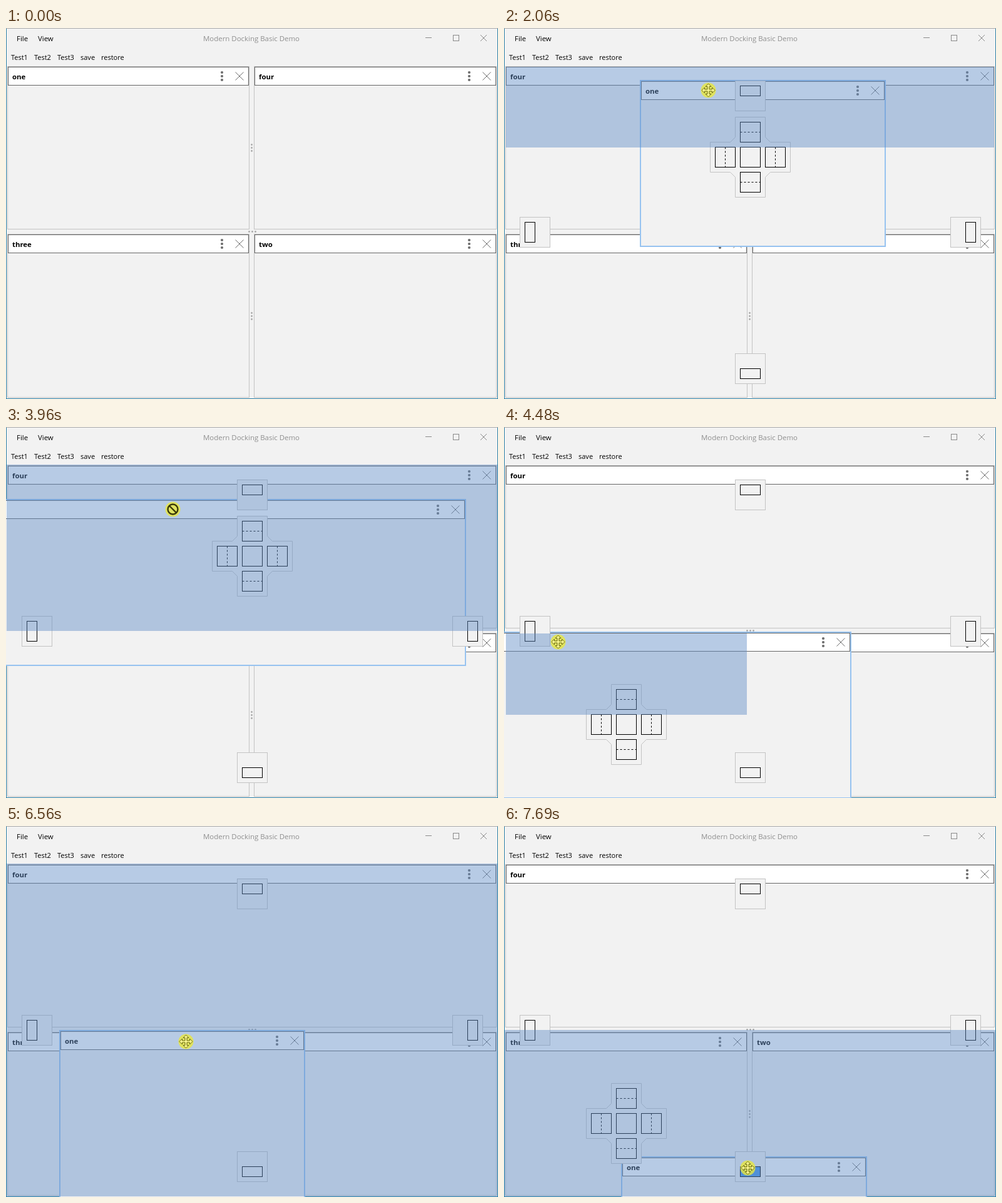
Write an HTML page with a canvas that moves like this. It is 786x593 px and loops after 8 s.

```html
<!DOCTYPE html>
<html lang="en">
<head>
<meta charset="utf-8">
<title>Docking demo</title>
<style>
html, body { margin: 0; width: 100%; height: 100%; overflow: hidden; background: #f2f2f2; }
canvas { display: block; }
</style>
</head>
<body>
<canvas id="stage" width="786" height="593"></canvas>
<script>
const ctx = document.getElementById('stage').getContext('2d');
const LOOP = 8000, BG = '#f2f2f2', FOCUS = '#97c3f0', ICON = '#6e6e6e', EDGE = '#c3c3c3';
const ROOT = [2, 61, 784, 591], AREA = [1, 60, 785, 592];
const DENY = 240, PREVIEW_LAG = 18, HOVER_LAG = 280;

// Pointer moves: from time, to time, end x, end y, bend; it rests in between
const ENTER = [640, 592];
const MOVES = [
  [30, 820, 108, 84, 2], [850, 970, 110, 76],
  [1480, 2060, 326, 99], [2060, 2260, 352, 110], [2400, 2570, 386, 106],
  [3310, 3500, 320, 76],
  [3750, 3960, 266, 131], [3960, 4480, 86, 343], [4580, 4960, 42, 328],
  [5480, 5920, 198, 106], [5920, 6010, 203, 78],
  [6280, 6560, 287, 344], [6560, 7070, 355, 521], [7110, 7360, 372, 540], [7520, 7690, 389, 546]
];

// Layout trees: [direction, first, second]
const BOTTOM = ['v', 'three', 'two'];
const REST = ['h', 'four', BOTTOM];
const START = ['h', ['v', 'one', 'four'], BOTTOM];

// Each drag of panel "one": its times, the root side it docks to, the layout after
const DRAGS = [
  { press: 1220, start: 1480, drop: 2880, side: 'n', tree: ['h', 'one', REST] },
  { press: 3750, start: 3750, drop: 5450, side: 'w', tree: ['v', 'one', REST] },
  { press: 6150, start: 6280, drop: LOOP }
];

const SIDES = { n: [0, -1], s: [0, 1], w: [-1, 0], e: [1, 0] };

function pointer(t) {
  let [x, y] = ENTER;
  for (const [from, to, x1, y1, bend = 1] of MOVES) {
    const k = Math.min(1, Math.max(0, (t - from) / (to - from)));
    x += (x1 - x) * k ** bend;
    y += (y1 - y) * k;
    if (k < 1) break;
  }
  return [Math.round(x), Math.round(y)];
}

const inside = ([x0, y0, x1, y1], x, y) => x >= x0 && x < x1 && y >= y0 && y < y1;
const mid = (a, b) => Math.floor((a + b) / 2);

function box(x, y, w, h, stroke, fill) {
  if (fill) { ctx.fillStyle = fill; ctx.fillRect(x, y, w, h); }
  if (stroke) {
    ctx.strokeStyle = stroke;
    ctx.strokeRect(x + .5, y + .5, w - 1, h - 1);
  }
}

function lines(color, ...paths) {
  ctx.strokeStyle = color;
  ctx.beginPath();
  for (const p of paths) p.forEach(([x, y], i) => i ? ctx.lineTo(x, y) : ctx.moveTo(x, y));
  ctx.stroke();
}

function shape(x, y, pts, fill, stroke) {
  ctx.beginPath();
  for (const [dx, dy] of pts) ctx.lineTo(x + dx, y + dy);
  ctx.closePath();
  ctx.fillStyle = fill;
  ctx.fill();
  ctx.strokeStyle = stroke;
  ctx.stroke();
}

// Repeats a list of points in four quarter turns
function fourfold(pts) {
  const turn = list => list.map(([x, y]) => [-y, x]);
  const b = turn(pts), c = turn(b);
  return [...pts, ...b, ...c, ...turn(c)];
}

function dot(x, y, r, color) {
  ctx.fillStyle = color;
  ctx.beginPath();
  ctx.arc(x, y, r, 0, 7);
  ctx.fill();
}

function text(s, x, y, size, color = '#000', weight = 400) {
  ctx.font = `${weight} ${size}px "Open Sans", "Noto Sans", sans-serif`;
  ctx.fillStyle = color;
  ctx.fillText(s, x, y);
}

function cross(x, y, r, color) {
  lines(color, [[x - r, y - r], [x + r, y + r]], [[x + r, y - r], [x - r, y + r]]);
}

function chrome(active) {
  const ink = active ? '#000' : '#8a8a8a';
  box(0, 0, 786, 593, active ? '#20505f' : '#2a7ea6', BG);
  box(0, 0, 786, 1, null, active ? '#6f7678' : '#a9a9a9');
  text('File', 17, 21, 11.4);
  text('View', 51, 21, 11.4);
  text('Modern Docking Basic Demo', 315, 21, 11.44, active ? '#5c5560' : '#8f8f8f');
  ['Test1', 'Test2', 'Test3', 'save', 'restore'].forEach((s, i) =>
    text(s, 8 + 37 * i - (i > 3 ? 4 : 0), 51, 11));
  box(670, 15, 10, 1, null, ink);
  box(714, 11, 10, 10, ink);
  cross(763, 16, 5, ink);
}

function panel(name, [x0, y0, x1, y1], focus) {
  box(x0, y0, x1 - x0, y1 - y0, EDGE, BG);
  if (focus) {
    ctx.lineWidth = 2;
    ctx.strokeStyle = FOCUS;
    ctx.strokeRect(x0, y0, x1 - x0, y1 - y0);
    ctx.lineWidth = 1;
  }
  box(x0 + 1, y0 + 1, x1 - x0 - 2, 30, '#666', '#fff');
  text(name, x0 + 8, y0 + 21, 11.4, '#000', 700);
  for (const d of [-6, 0, 6]) dot(x1 - 44, y0 + 16 + d, 2.1, ICON);
  cross(x1 - 16, y0 + 16, 6.5, ICON);
}

// Splits the area in halves and collects panels and divider grips
function arrange(node, [x0, y0, x1, y1], out = { panels: {}, grips: [] }) {
  if (typeof node === 'string') {
    out.panels[node] = [x0, y0, x1, y1];
    return out;
  }
  const [dir, a, b] = node;
  if (dir === 'v') {
    const m = mid(x0, x1 - 7);
    out.grips.push([m + 3.5, mid(y0, y1) + .5, 0, 5]);
    arrange(a, [x0, y0, m, y1], out);
    arrange(b, [m + 7, y0, x1, y1], out);
  } else {
    const m = mid(y0, y1 - 7);
    out.grips.push([mid(x0, x1) + .5, m + 3.5, 5, 0]);
    arrange(a, [x0, y0, x1, m], out);
    arrange(b, [x0, m + 7, x1, y1], out);
  }
  return out;
}

function half([x0, y0, x1, y1], side) {
  const mx = mid(x0, x1), my = mid(y0, y1);
  return { n: [x0, y0, x1, my], s: [x0, my, x1, y1], w: [x0, y0, mx, y1],
    e: [mx, y0, x1, y1] }[side] || [x0, y0, x1, y1];
}

function nearSide([x0, y0, x1, y1], x, y) {
  const h = (x - x0) / (x1 - x0), v = (y - y0) / (y1 - y0);
  const dh = Math.min(h, 1 - h), dv = Math.min(v, 1 - v);
  if (Math.min(dh, dv) > .35) return 'c';
  return dh < dv ? (h < .5 ? 'w' : 'e') : (v < .5 ? 'n' : 's');
}

// Outer corner and inner rectangle of the dock handle on a side
function handle(side) {
  const [dx, dy] = SIDES[side], ox = 369 + 344 * dx, oy = 302 + 218 * dy;
  return { ox, oy, x: ox + (dx > 0 ? 24 : 8), y: oy + (dy > 0 ? 24 : 8),
    w: dx ? 17 : 33, h: dy ? 17 : 33 };
}

function handles(hot) {
  for (const side in SIDES) {
    const { ox, oy, x, y, w, h } = handle(side);
    box(ox, oy, 49, 49, EDGE, BG);
    box(x, y, w, h, '#000', side === hot ? '#4393e7' : null);
  }
}

function compass([x0, y0, x1, y1]) {
  const cx = mid(x0, x1) + .5, cy = mid(y0 + 30, y1) + .5;
  shape(cx, cy, fourfold([[-24, -64], [24, -64], [24, -32], [32, -24]]), BG, EDGE);
  for (const [dx, dy] of [[0, 0], ...Object.values(SIDES)]) {
    const x = cx + 40 * dx, y = cy + 40 * dy;
    box(x - 16.5, y - 16.5, 33, 33, '#000');
    ctx.setLineDash([3, 3]);
    if (dy) lines('#000', [[x - 16, y], [x + 16, y]]);
    if (dx) lines('#000', [[x, y - 16], [x, y + 16]]);
    ctx.setLineDash([]);
  }
}

function arrow(x, y) {
  shape(x + .5, y + .5, [[0, 0], [0, 16], [3.7, 12.5], [6.3, 18], [8.7, 17], [6.2, 11.5], [11, 11.3]],
    '#fff', '#000');
}

function moveIcon(x, y) {
  const arm = [[-1.5, -1.5], [-1.5, -6], [-4.5, -6], [0, -10.5], [4.5, -6], [1.5, -6]];
  shape(x + .5, y + .5, fourfold(arm), '#f7f58c', '#6b6a10');
}

function denyIcon(x, y) {
  ctx.lineWidth = 2.4;
  ctx.strokeStyle = '#3b3a08';
  ctx.beginPath();
  ctx.arc(x + .5, y + .5, 8, 0, 7);
  ctx.moveTo(x - 5, y - 5);
  ctx.lineTo(x + 6, y + 6);
  ctx.stroke();
  ctx.lineWidth = 1;
}

function dragLayer(n, panels, t) {
  const { start } = DRAGS[n], last = DRAGS[n - 1];
  const [x0, y0, x1, y1] = arrange(last ? last.tree : START, ROOT).panels.one;
  const [gx, gy] = pointer(start), [px, py] = pointer(t);
  const wx = x0 + px - gx, wy = y0 + py - gy;
  panel('one', [wx, wy, wx + x1 - x0 + 4, wy + y1 - y0 + 4], true);

  // The preview trails the pointer and at first keeps the last docked side
  const [x, y] = pointer(t - PREVIEW_LAG);
  const under = Object.values(panels).find(p => inside(p, x, y));
  const hot = Object.keys(SIDES).find(side => {
    const r = handle(side);
    return inside([r.x, r.y, r.x + r.w, r.y + r.h], x, y);
  });
  handles(hot);
  if (under) compass(under);

  let zone = AREA;
  if (last && t - start < DENY) zone = half(AREA, last.side);
  else if (hot) zone = half(AREA, hot);
  else if (under) {
    const inner = under.map((v, i) => v + (i < 2 ? 1 : -1));
    zone = half(inner, nearSide(inner, x, y));
  }
  box(zone[0], zone[1], zone[2] - zone[0], zone[3] - zone[1], null, 'rgba(95,140,198,.45)');
}

function draw(t) {
  const n = DRAGS.findIndex(d => t >= d.start && t < d.drop), dragging = n >= 0;
  const pressed = DRAGS.some(d => t >= d.press && t < d.drop);
  const settling = DRAGS.some(d => t >= d.drop && t < d.drop + 50);
  const done = DRAGS.filter(d => t >= d.drop).pop();
  const { panels, grips } = arrange(dragging ? REST : done ? done.tree : START, ROOT);
  const [x, y] = pointer(t), [hx, hy] = pointer(t - HOVER_LAG);
  const entered = t >= MOVES[0][0];

  chrome(t >= DRAGS[0].press && !dragging && !settling);
  for (const name in panels)
    panel(name, panels[name], entered && !dragging && inside(panels[name], hx, Math.min(hy, 590)));
  for (const [gx, gy, dx, dy] of grips)
    for (const k of [-1, 0, 1]) dot(gx + dx * k, gy + dy * k, 1.4, '#aaa');
  if (dragging) dragLayer(n, panels, t);

  if (!entered) return;
  if (pressed) dot(x + .5, y + .5, 12, 'rgba(233,231,63,.8)');
  if (!dragging) arrow(x, y);
  else if (t - DRAGS[n].start < DENY) denyIcon(x, y);
  else moveIcon(x, y);
}

const begin = performance.now();
function tick() {
  draw((performance.now() - begin) % LOOP);
  requestAnimationFrame(tick);
}
tick();
</script>
</body>
</html>
```
